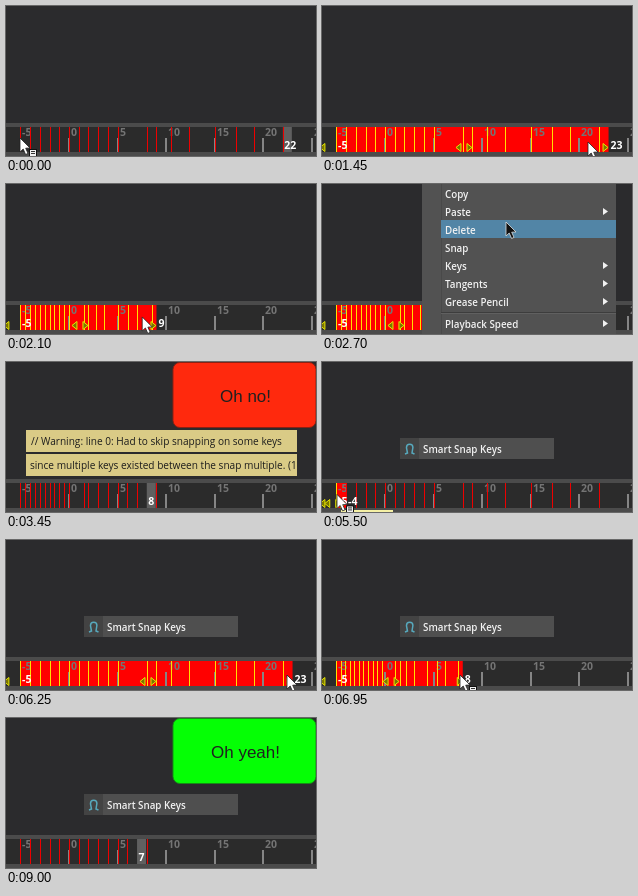
Recreate the animation shown at these times as an HTML page with a canvas. Size 310 px wide and 150 px high, loop 9.1 s.

```html
<!DOCTYPE html>
<html lang="en">
<head>
<meta charset="utf-8">
<title>Snapping keys on a timeline</title>
<style>
html, body { margin: 0; width: 100%; height: 100%; overflow: hidden; background: #2b2b2d; }
canvas { display: block; }
</style>
</head>
<body>
<canvas id="stage" width="310" height="150"></canvas>
<script>
const ctx = document.getElementById('stage').getContext('2d');
const LOOP = 9100, STEP = 50, START = -5;
const UI = '"Open Sans", sans-serif';
const RED = '#ff0000', YELLOW = '#ffe000', GREY = '#4b4b4b', BLUE = '#5285a6';
const KEYS = [-5, -4, -3, -2, -1, 0, 1, 2, 3, 4, 5, 8, 9, 10.5, 12.3, 15, 17.2, 19, 22];
const MENU = ['Copy', 'Paste', 'Delete', 'Snap', 'Keys', 'Tangents', 'Grease Pencil', 'Playback Speed'];
const SUBMENUS = [1, 4, 5, 6, 7];

const frameX = f => 63 + 9.72 * f;
const scaled = end => KEYS.map(k => START + (k - START) * (end - START) / 28);
const between = (t, a, b) => t >= a && t < b;

// Linear interpolation through [time, value] stops.
function track(t, stops) {
  let i = stops.findIndex(s => s[0] > t);
  if (i < 0) return stops[stops.length - 1][1];
  if (i === 0) return stops[0][1];
  const [t0, a] = stops[i - 1], [t1, b] = stops[i];
  return a + (b - a) * (t - t0) / (t1 - t0);
}

function rect(x, y, w, h, color) {
  ctx.fillStyle = color;
  ctx.fillRect(x, y, w, h);
}

function text(str, x, y, font, color, align = 'left') {
  ctx.font = font;
  ctx.textAlign = align;
  ctx.fillStyle = color;
  ctx.fillText(str, x, y);
}

function poly(points, color) {
  ctx.beginPath();
  points.forEach(([x, y]) => ctx.lineTo(x, y));
  ctx.closePath();
  ctx.fillStyle = color;
  ctx.fill();
}

const number = (n, x, y, color) => text(n, x, y, `700 10.5px ${UI}`, color);
const label = (str, x, y) => text(str, x, y, `600 9.8px ${UI}`, '#f2f2f2');

// Keys sharing a frame stay where they are, the others snap.
function partialSnap(keys) {
  const rounded = keys.map(Math.round);
  return keys.map((k, i) => rounded.filter(r => r === rounded[i]).length > 1 ? k : rounded[i]);
}

function timelineState(t) {
  let end = null, now = 22, keys = KEYS;
  if (between(t, 300, 3350)) {
    end = t < 1250 ? track(t, [[300, -4], [1200, 23]]) : track(t, [[1450, 23], [1900, 9]]);
    if (t > 1450) keys = scaled(Math.round(end));
  } else if (between(t, 3350, 4350)) {
    keys = partialSnap(scaled(9));
    now = 8;
  } else if (between(t, 5400, 7950)) {
    end = t < 6100 ? track(t, [[5500, -4], [5950, 23]]) : track(t, [[6250, 23], [6800, 8]]);
    if (t > 6250) keys = scaled(Math.round(end));
  } else if (t >= 7950) {
    keys = [...Array(12).keys()].map(i => i + START).concat(8);
    now = 7;
  }
  return { end: end === null ? null : Math.round(end), now, keys };
}

function handle(x, dir) {
  const back = dir < 0 ? x + 5.5 : x + .5, tip = dir < 0 ? x + .5 : x + 5.5;
  ctx.beginPath();
  ctx.moveTo(back, 137.5);
  ctx.lineTo(tip, 141.5);
  ctx.lineTo(back, 145.5);
  ctx.closePath();
  ctx.fillStyle = '#7c7600';
  ctx.fill();
  ctx.strokeStyle = '#e6e600';
  ctx.lineWidth = 1;
  ctx.stroke();
}

function drawTimeline({ end, now, keys }) {
  const selected = end !== null, left = frameX(START), right = selected ? frameX(end) : 0;
  rect(0, 117, 310, 4, GREY);
  rect(0, 121, 310, 25, '#2b2b2b');
  rect(0, 146, 310, 4, GREY);
  if (selected) rect(left, 121, right - left, 25, RED);
  else rect(frameX(now), 121, 9, 25, '#606060');
  for (let f = -5; f <= 25; f += 5) {
    if (f > START) rect(Math.round(frameX(f)) - 1, 132, 2, 14, '#858585');
    number(f, Math.round(frameX(f)) + 2, 130, '#747474');
  }
  for (const k of keys)
    rect(Math.round(frameX(k)), 121, 1, 25, selected && k < end ? YELLOW : '#ee0000');
  if (selected) {
    const mid = (left + right) / 2;
    handle(left - 17, -1);
    handle(mid - 17, -1);
    handle(mid - 6, 1);
    handle(right - 6, 1);
    number(START, 16, 143, '#fff');
    number(end, right + 2, 143, '#fff');
  } else {
    number(now, frameX(now) + 1.5, 143, '#fff');
  }
}

function drawMenu(hover) {
  rect(100, 0, 194, 150, '#525252');
  rect(119, 0, 1, 150, '#494949');
  if (hover >= 0) rect(119, hover * 18, 175, 18, BLUE);
  rect(119, 128, 175, 1, '#3d3d3d');
  rect(119, 129, 175, 1, '#606060');
  MENU.forEach((name, i) => {
    const y = i === 7 ? 140 : 10 + i * 18;
    label(name, 123, y + 4);
    if (SUBMENUS.includes(i)) poly([[281, y - 4], [286, y - .5], [281, y + 3]], '#f2f2f2');
  });
}

function drawButton(hover) {
  rect(78, 76, 154, 21, '#4f4f4f');
  rect(78, 76, 19, 21, '#434343');
  if (hover) rect(97, 78, 135, 19, BLUE);
  ctx.strokeStyle = '#57a9bd';
  ctx.lineWidth = 1.5;
  ctx.beginPath();
  ctx.moveTo(83, 92);
  ctx.lineTo(85.5, 91);
  ctx.lineTo(84.5, 86);
  ctx.arc(87.7, 85.5, 3.2, Math.PI, 0);
  ctx.lineTo(90, 91);
  ctx.lineTo(92.5, 92);
  ctx.stroke();
  label('Smart Snap Keys', 101, 91);
}

function drawBanner(str, fill, edge) {
  ctx.beginPath();
  ctx.roundRect(167, .5, 143, 65, 7);
  ctx.fillStyle = fill;
  ctx.fill();
  ctx.strokeStyle = edge;
  ctx.lineWidth = 1;
  ctx.stroke();
  text(str, 239.5, 40, '17px "Liberation Sans", Arial, sans-serif', '#202020', 'center');
}

function drawWarning() {
  const lines = ['// Warning: line 0: Had to skip snapping on some keys',
    'since multiple keys existed between the snap multiple. (1)'];
  ctx.save();
  ctx.beginPath();
  ctx.rect(20, 68, 271, 46);
  ctx.clip();
  lines.forEach((line, i) => {
    rect(20, 68 + i * 24, 271, 22, '#dacb86');
    text(line, 25 - i, 83 + i * 24, `10.1px ${UI}`, '#1c1c1c');
  });
  ctx.restore();
}

function drawCursor(x, y, dark, badge) {
  const shape = [[0, 0], [0, 14], [3.2, 11], [5.6, 16.5], [8, 15.4], [5.7, 10.2], [10, 10]];
  ctx.save();
  ctx.translate(x, y);
  poly(shape, dark ? '#111' : '#fff');
  ctx.strokeStyle = dark ? '#ddd' : '#222';
  ctx.lineWidth = .8;
  ctx.stroke();
  if (badge) {
    rect(9, 11, 8, 8, '#111');
    rect(10, 12, 6, 6, '#eee');
    rect(11, 13, 4, 1, '#333');
    rect(11, 15, 4, 1, '#333');
  }
  ctx.restore();
}

function cursorAt(t) {
  const path = (xs, ys) => [track(t, xs), track(t, ys)];
  if (t < 1250) return path([[0, 14], [50, 16], [150, 17], [300, 17], [1200, 283]], [[0, 132], [1200, 135]]);
  if (t < 2600) return path([[1250, 283], [1400, 281], [1450, 266], [1900, 146], [2050, 146], [2300, 97]],
    [[1250, 135], [1450, 136], [2300, 132]]);
  if (t < 3350) return path([[2600, 120], [2700, 184], [2850, 186], [3150, 172]],
    [[2600, 105], [2700, 38], [2850, 24], [3150, 60]]);
  if (between(t, 4800, 6100)) return path([[4800, 160], [5250, 15], [5500, 15], [5950, 283]],
    [[4800, 128], [5250, 131], [5950, 135]]);
  if (between(t, 6100, 7150)) return path([[6100, 283], [6250, 281], [6800, 138], [6950, 138], [7100, 140]],
    [[6100, 135], [6950, 135], [7100, 133]]);
  if (between(t, 7400, 7650)) return [t < 7450 ? 134 : 132, 79];
  return null;
}

function draw(t) {
  rect(0, 0, 310, 150, '#2b2b2d');
  drawTimeline(timelineState(t));
  const cursor = cursorAt(t), inMenu = between(t, 2600, 3350);
  if (between(t, 2400, 3350)) drawMenu(inMenu ? Math.floor(cursor[1] / 18) : -1);
  if (between(t, 3400, 4450)) drawWarning();
  if (between(t, 3450, 4350)) drawBanner('Oh no!', '#ff290d', '#8c2012');
  if (t >= 4550) drawButton(between(t, 7400, 9000));
  if (t >= 8050) drawBanner('Oh yeah!', '#05ff05', '#168c16');
  if (between(t, 5400, 5550)) rect(19, 148, 52, 2, '#f5f0a5');
  if (cursor) drawCursor(...cursor, inMenu || between(t, 7400, 7650), t < 300 || between(t, 5250, 5550) || between(t, 6950, 7150));
}

const origin = performance.now();
function tick() {
  const t = (performance.now() - origin) % LOOP;
  draw(Math.floor(t / STEP) * STEP);
  requestAnimationFrame(tick);
}
tick();
</script>
</body>
</html>
```
